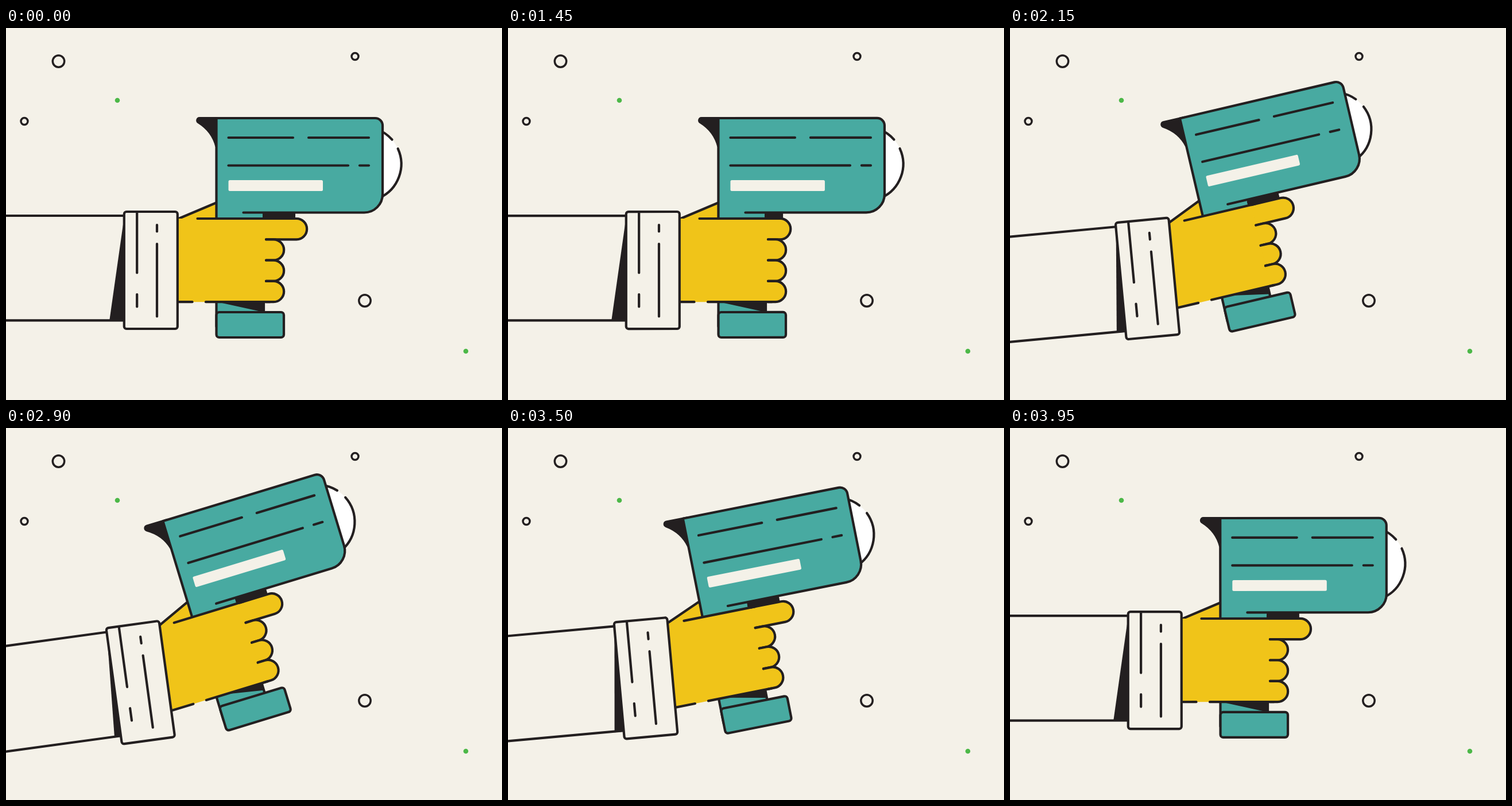
An HTML page with a canvas that plays this animation: 864x648 px, repeating every 4000 ms.

```html
<!DOCTYPE html>
<html lang="en">
<head>
<meta charset="utf-8">
<title>Speed gun</title>
<style>
  html, body { margin: 0; width: 100%; height: 100%; overflow: hidden; background: #f4f1e8; }
  canvas { display: block; }
</style>
</head>
<body>
<canvas id="stage" width="864" height="648"></canvas>
<script>
const ctx = document.getElementById('stage').getContext('2d');
const LOOP = 4000;
const INK = '#231f20', PAPER = '#f4f1e8', TEAL = '#48aaa1', YELLOW = '#f0c419';
const DOT = '#4cb848', WAVE = '#6ab657';
const STROKE = 4.2;
const ARM_PIVOT = [400, 565], ARM_ANGLE = 7.8;
const WRIST_PIVOT = [296, 387], WRIST_ANGLE = 9.15;

// Cubic bezier easing with handles (x1, 0) and (x2, 1), solved by bisection.
function ease(time, from, to, x1, x2) {
  const u = Math.min(1, Math.max(0, (time - from) / (to - from)));
  let low = 0, high = 1;
  for (let i = 0; i < 24; i++) {
    const s = (low + high) / 2, r = 1 - s;
    if (3 * r * r * s * x1 + 3 * r * s * s * x2 + s * s * s < u) low = s; else high = s;
  }
  return low * low * (3 - 2 * low);
}

function paint(fill, stroke, width = STROKE) {
  if (fill) { ctx.fillStyle = fill; ctx.fill(); }
  if (stroke) { ctx.strokeStyle = stroke; ctx.lineWidth = width; ctx.stroke(); }
}

function line(x1, y1, x2, y2) {
  ctx.beginPath();
  ctx.moveTo(x1, y1);
  ctx.lineTo(x2, y2);
  paint(null, INK);
}

function polygon(fill, ...points) {
  ctx.beginPath();
  points.forEach(([x, y]) => ctx.lineTo(x, y));
  ctx.closePath();
  paint(fill);
}

function box(x, y, w, h, radius, fill, stroke) {
  ctx.beginPath();
  ctx.roundRect(x, y, w, h, radius);
  paint(fill, stroke);
}

function circle(x, y, radius, fill, stroke) {
  ctx.beginPath();
  ctx.arc(x, y, radius, 0, Math.PI * 2);
  paint(fill, stroke, 3.5);
}

function tilt([x, y], degrees) {
  ctx.translate(x, y);
  ctx.rotate(-degrees * Math.PI / 180);
  ctx.translate(-x, -y);
}

function drawBackground() {
  ctx.fillStyle = PAPER;
  ctx.fillRect(0, 0, 864, 648);
  circle(91.5, 58, 10.2, null, INK);
  circle(625, 475, 10.2, null, INK);
  circle(608, 49.5, 6, null, INK);
  circle(32, 162.5, 6, null, INK);
  circle(194, 126, 4.3, DOT);
  circle(801, 563, 4.3, DOT);
}

function drawLens() {
  circle(624, 237, 64.5, '#fff');
  for (const [from, to] of [[-1.2, -0.72], [-0.43, 1.2]]) {
    ctx.beginPath();
    ctx.arc(624, 237, 64.5, from, to);
    paint(null, INK);
  }
}

function drawWave(age) {
  if (age <= 0 || age >= 500) return;
  ctx.lineCap = 'butt';
  ctx.beginPath();
  ctx.arc(625, 234, age * (0.905 - 0.00033 * age), -0.858, 0.858);
  paint(null, WAVE);
  ctx.lineCap = 'round';
}

function drawGun(pull, lift) {
  // Handle with the shadow cast by the hand
  ctx.fillStyle = TEAL;
  ctx.fillRect(366, 325, 83, 172);
  polygon(INK, [367 + 14 * lift, 477], [449, 477], [449, 495 - 5 * lift]);
  line(449, 470, 449, 494);

  ctx.fillStyle = INK;
  ctx.fillRect(447, 321, 57 - 25 * pull, 12);

  // Rear sight
  ctx.beginPath();
  ctx.moveTo(376, 155);
  ctx.lineTo(337, 155);
  ctx.bezierCurveTo(331, 155, 329, 163, 334, 166);
  ctx.quadraticCurveTo(358, 181, 364.5, 207);
  ctx.lineTo(368, 207);
  ctx.lineTo(368, 157);
  ctx.closePath();
  paint(INK);

  // Body
  ctx.beginPath();
  ctx.moveTo(366.5, 157);
  ctx.arcTo(656, 157, 656, 200, 13);
  ctx.arcTo(656, 321.5, 600, 321.5, 32);
  ctx.lineTo(447, 321.5);
  ctx.lineTo(447, 334);
  ctx.lineTo(366.5, 334);
  ctx.closePath();
  paint(TEAL);
  ctx.beginPath();
  ctx.moveTo(366.5, 520);
  ctx.lineTo(366.5, 157);
  ctx.arcTo(656, 157, 656, 200, 13);
  ctx.arcTo(656, 321.5, 600, 321.5, 32);
  ctx.lineTo(413.5, 321.5);
  paint(null, INK);

  line(387.5, 191, 500, 191);
  line(527, 191, 632, 191);
  line(387.5, 239.5, 596, 239.5);
  line(616, 239.5, 632, 239.5);
  box(387.5, 265, 164.5, 19, 2.5, PAPER);
  box(366.5, 495, 117.5, 44, 5, TEAL, INK);
}

function drawHand(pull) {
  const height = 36.3, radius = height / 2, top = 332;
  const tips = [506 - 32 * pull, 466, 466, 466];

  polygon(YELLOW, [270, 345], [366, 304.5], [366, 340], [270, 345]);
  line(270, 345, 366, 304.5);
}

function drawFist(pull) {
  const height = 36.3, radius = height / 2, top = 332;
  const tips = [506 - 32 * pull, 466, 466, 466];

  polygon(YELLOW, [270, 345], [299, 332], [466, 332], [466, 477.2], [270, 477.2]);
  tips.forEach((x, i) => {
    const y = top + i * height;
    ctx.beginPath();
    ctx.moveTo(453, y);
    ctx.lineTo(x, y);
    ctx.arc(x, y + radius, radius, -Math.PI / 2, Math.PI / 2);
    ctx.lineTo(453, y + height);
    paint(YELLOW, INK);
  });
  line(333.5, top, 460, top);
  line(270, 477.2, 324.5, 477.2);
  line(348, 477.2, 460, 477.2);
}

function drawSleeve(swing) {
  polygon(INK, [206, 328], [206, 511], [180 + 14.5 * swing, 511]);
  line(-120, 327, 206, 327);
  line(-120, 509.4, 206, 509.4);
  box(205.8, 320, 93, 204, 4, PAPER, INK);
  line(228.2, 322, 228.2, 426.5);
  line(228.2, 464, 228.2, 485.5);
  line(263, 343, 263, 354.5);
  line(263, 376, 263, 502.5);
}

function draw(time) {
  const drop = 1 - ease(time, 2850, 4000, 0.82, 0.54);
  const swing = ease(time, 1400, 2350, 1, 0.64) * drop;
  const lift = ease(time, 1400, 2350, 1, 0.53) * drop;
  const pull = ease(time, 0, 400, 0.8, 0.55) - ease(time, 1400, 1900, 0.8, 0.55);

  ctx.lineCap = ctx.lineJoin = 'round';
  drawBackground();

  ctx.save();
  tilt(ARM_PIVOT, ARM_ANGLE * swing);
  ctx.save();
  tilt(WRIST_PIVOT, WRIST_ANGLE * lift);
  drawLens();
  drawWave(time - 300);
  drawWave(time - 800);
  drawThumb();
  drawGun(pull, lift);
  drawFist(pull);
  ctx.restore();
  drawSleeve(swing);
  ctx.restore();
}

function drawThumb() {
  polygon(YELLOW, [270, 345], [366, 304.5], [366, 345]);
  line(270, 345, 366, 304.5);
}

function tick() {
  draw(performance.now() % LOOP);
  requestAnimationFrame(tick);
}
tick();
</script>
</body>
</html>
```
